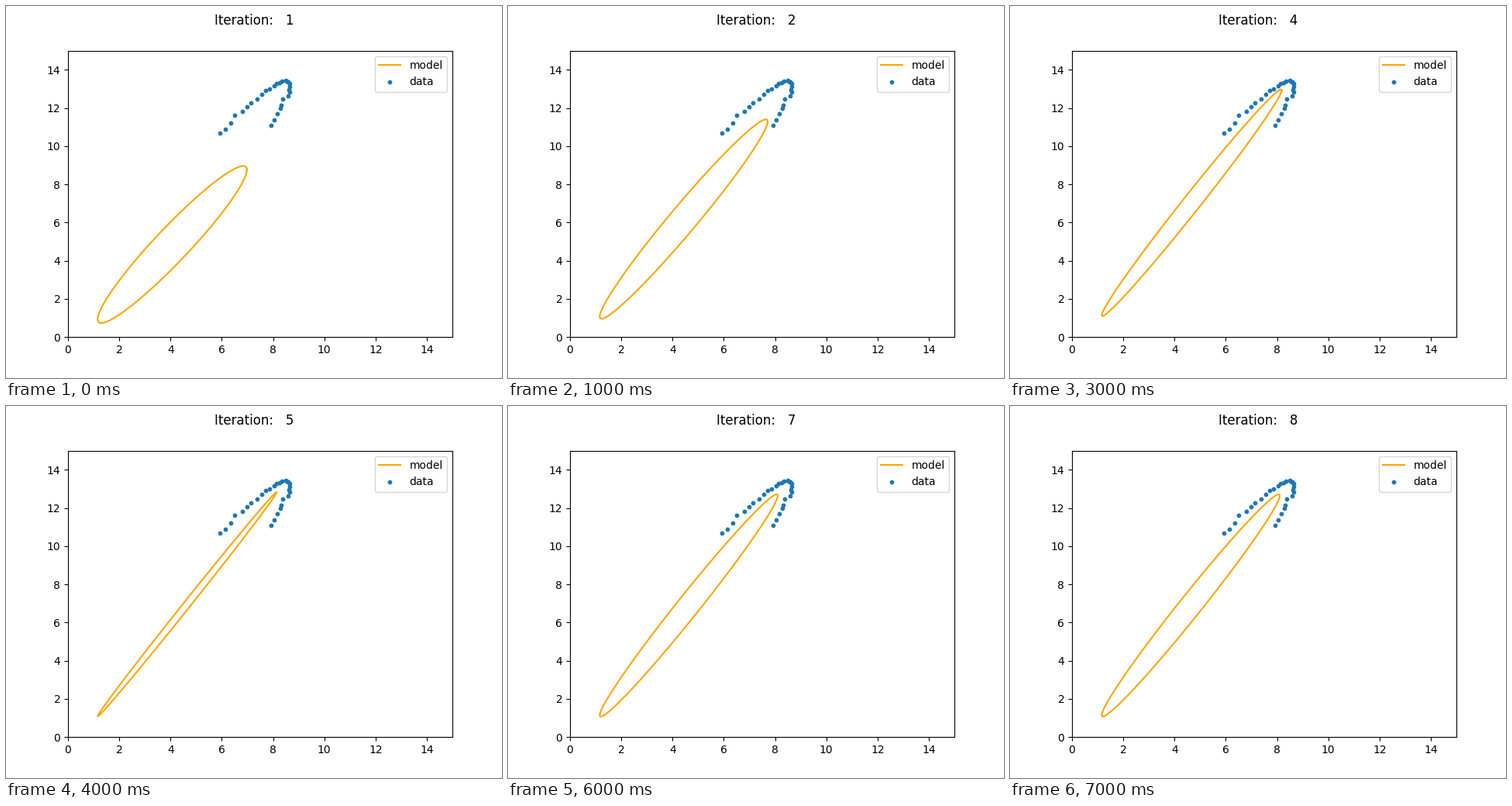
Write a matplotlib script that moves like this. It is 640x480 px and loops after 8000 ms.

```python
import numpy as np
import matplotlib.pyplot as plt
from matplotlib.animation import FuncAnimation

STEPS = 8
# Height of the upper tip and phase lag of y while the fit converges
POSES = [(8.96, 0.315), (11.40, 0.21), (12.20, 0.174), (12.97, 0.122),
         (12.82, 0.05), (13.12, 0.073), (12.71, 0.158)]


def ellipse(t, center, radii, lag):
    x = center[0] + radii[0] * np.cos(t)
    y = center[1] + radii[1] * np.cos(t - lag)
    return np.array([x, y])


def fitted(step):
    """The lower tip barely moves; the upper one slides along a line."""
    top, lag = POSES[min(step, len(POSES) - 1)]
    rise = top - POSES[0][0]
    low = np.array([1.16, 0.74 + 0.09 * rise])
    high = np.array([6.98 + 0.3 * rise, top])
    t = np.linspace(0, 2 * np.pi, 400)
    return ellipse(t, (low + high) / 2, (high - low) / 2, lag)


def noisy_arc(count=30, noise=0.04):
    rng = np.random.default_rng(1)
    t = np.linspace(-1.6, 0.767, count)
    arc = ellipse(t, (5.98, 9.32), (2.67, 4.1), -0.351)
    return arc + rng.normal(0, noise, arc.shape)


fig, ax = plt.subplots(figsize=(6.4, 4.8), dpi=100)
ax.set(xlim=(0, 15), ylim=(0, 15))
model, = ax.plot([], [], color="orange", label="model")
ax.scatter(*noisy_arc(), s=10, label="data")
ax.legend(loc="upper right")
title = fig.suptitle("")


def update(step):
    model.set_data(*fitted(step))
    title.set_text(f"Iteration: {step + 1:3d}")
    return model, title


anim = FuncAnimation(fig, update, frames=STEPS, interval=1000,
                     repeat=True, repeat_delay=0)
plt.show()
```
